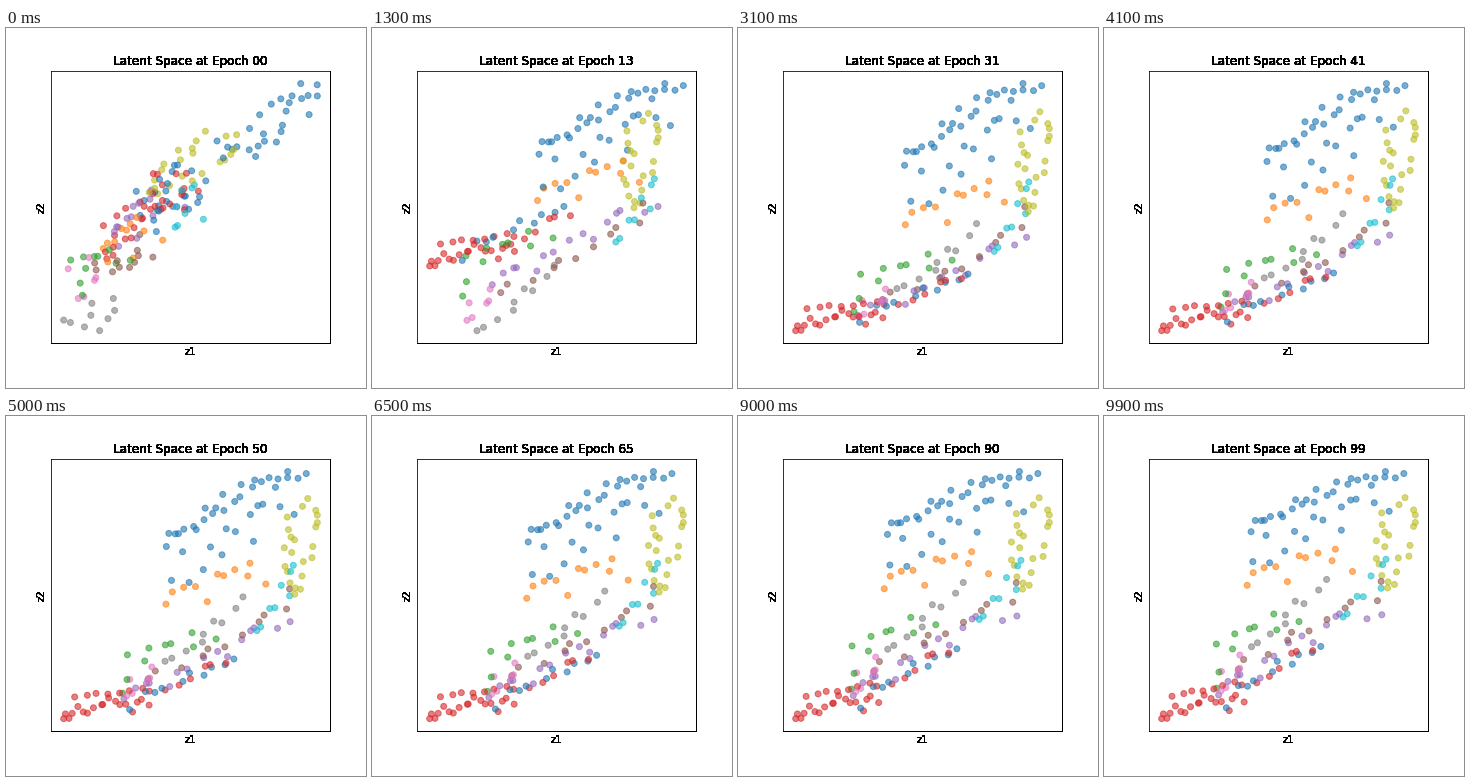
A matplotlib script for the animation above (10 s loop, 360 by 360 pixels).

```python
import numpy as np
import matplotlib.pyplot as plt
from matplotlib.animation import FuncAnimation

SIZE, DPI = 360, 72
EPOCHS, STEP_MS = 100, 100
SPLIT, MATURE = 13, 65   # epochs where classes part and where they reach home
DECAY = 8                # epochs for the parted layout to fade
DIAGONAL = np.array([0.79, -0.61])
DRIFT = np.array([-0.35, -0.4])
TEXT_LAYERS = 24         # stacked copies give hard, heavy lettering

plt.rcParams["font.family"] = "DejaVu Sans"
rng = np.random.default_rng(7)
colors, first, parted, home = [], [], [], []


def normal_to(v):
    return np.array([v[1], -v[0]]) / np.hypot(*v)


def cluster(color, count, seed_at, shift, a, b, half, bow=0):
    """Points that leave a diagonal cloud at seed_at for a bowed band a-b.

    shift is the offset from that band at the epoch where classes part."""
    along = ((np.arange(count) + rng.random(count)) / count)[:, None]
    across = rng.uniform(-1, 1, count)[:, None]
    reach = 10 + 1.8 * count
    span = np.subtract(b, a)
    arch = bow * 4 * along * (1 - along)
    band = a + along * span + (arch + across * half) * normal_to(span)
    first.append(seed_at + (2 * along - 1) * reach * DIAGONAL
                 + 18 * across * normal_to(DIAGONAL))
    parted.append(np.tile(shift, (count, 1)))
    home.append(band)
    colors.extend([color] * count)


cluster("tab:blue", 26, (255, 100), (18, 18), (155, 128), (300, 60), 8, bow=15)
cluster("tab:blue", 14, (165, 165), (18, 18), (160, 155), (285, 84), 16)
cluster("tab:blue", 10, (165, 175), (-24, -42), (122, 285), (230, 228), 6)
cluster("tab:red", 26, (145, 190), (8, -46), (59, 291), (148, 277), 13)
cluster("tab:red", 6, (155, 165), (-10, -37), (150, 270), (222, 234), 4)
cluster("tab:orange", 11, (130, 215), (18, 8), (150, 180), (260, 148), 14)
cluster("tab:green", 10, (100, 235), (-16, 10), (110, 258), (200, 200), 17)
cluster("tab:purple", 15, (140, 190), (11, -7), (108, 275), (276, 192), 10, bow=-8)
cluster("tab:brown", 11, (125, 230), (-3, 22), (135, 265), (294, 166), 11)
cluster("tab:pink", 6, (90, 248), (-16, 31), (116, 272), (154, 244), 8)
cluster("tab:gray", 9, (97, 285), (-41, 78), (155, 245), (234, 172), 6)
cluster("tab:olive", 22, (185, 140), (-17, 21), (285, 178), (296, 82), 17)
cluster("tab:cyan", 8, (182, 183), (4, 21), (237, 212), (292, 140), 7, bow=-5)

order = rng.permutation(len(colors))
colors = [colors[i] for i in order]
first, parted, home = (np.concatenate(p)[order] for p in (first, parted, home))


def unit(pts):
    low, high = pts.min(axis=0), pts.max(axis=0)
    return (pts - low) / (high - low)


# Points deep inside the cloud keep drifting; its rim stays put.
inner = np.sin(np.pi * unit(home)).prod(axis=1, keepdims=True)


def latent(epoch):
    """Point positions at an epoch, fitted to the unit square."""
    if epoch < SPLIT:
        mix = (epoch / SPLIT) ** 0.7
        left, settled = 1, 0
    else:
        mix = 1
        left = np.exp((SPLIT - epoch) / DECAY)
        settled = 1 - left
    drift = DRIFT * (epoch - MATURE) * settled * inner
    target = home + parted * left + drift
    return unit(first + mix * (target - first))


fig = plt.figure(figsize=(SIZE / DPI, SIZE / DPI), dpi=DPI, facecolor="white")
ax = fig.add_axes([0.125, 0.125, 0.775, 0.755])
ax.set(xlim=(-0.05, 1.05), ylim=(1.05, -0.05), xticks=[], yticks=[])
ax.spines[["left", "top"]].set_linewidth(0.8)
ax.spines[["right", "bottom"]].set_linewidth(1)
dots = ax.scatter(*latent(0).T, c=colors, s=36, alpha=0.6)


def label(x, y, text, **style):
    return [fig.text(x / SIZE, 1 - y / SIZE, text, ha="center", **style)
            for _ in range(TEXT_LAYERS)]


titles = label(184.5, 37.2, "", fontsize=12, va="baseline")
label(184.5, 319, "z1", fontsize=10, va="top")
label(41, 179, "z2", fontsize=10, va="bottom", rotation=90, rotation_mode="anchor")


def draw(epoch):
    dots.set_offsets(latent(epoch))
    for title in titles:
        title.set_text(f"Latent Space at Epoch {epoch:02d}")
    return [dots, *titles]


anim = FuncAnimation(fig, draw, frames=EPOCHS, interval=STEP_MS,
                     repeat=True, repeat_delay=0, blit=False)
plt.show()
```
